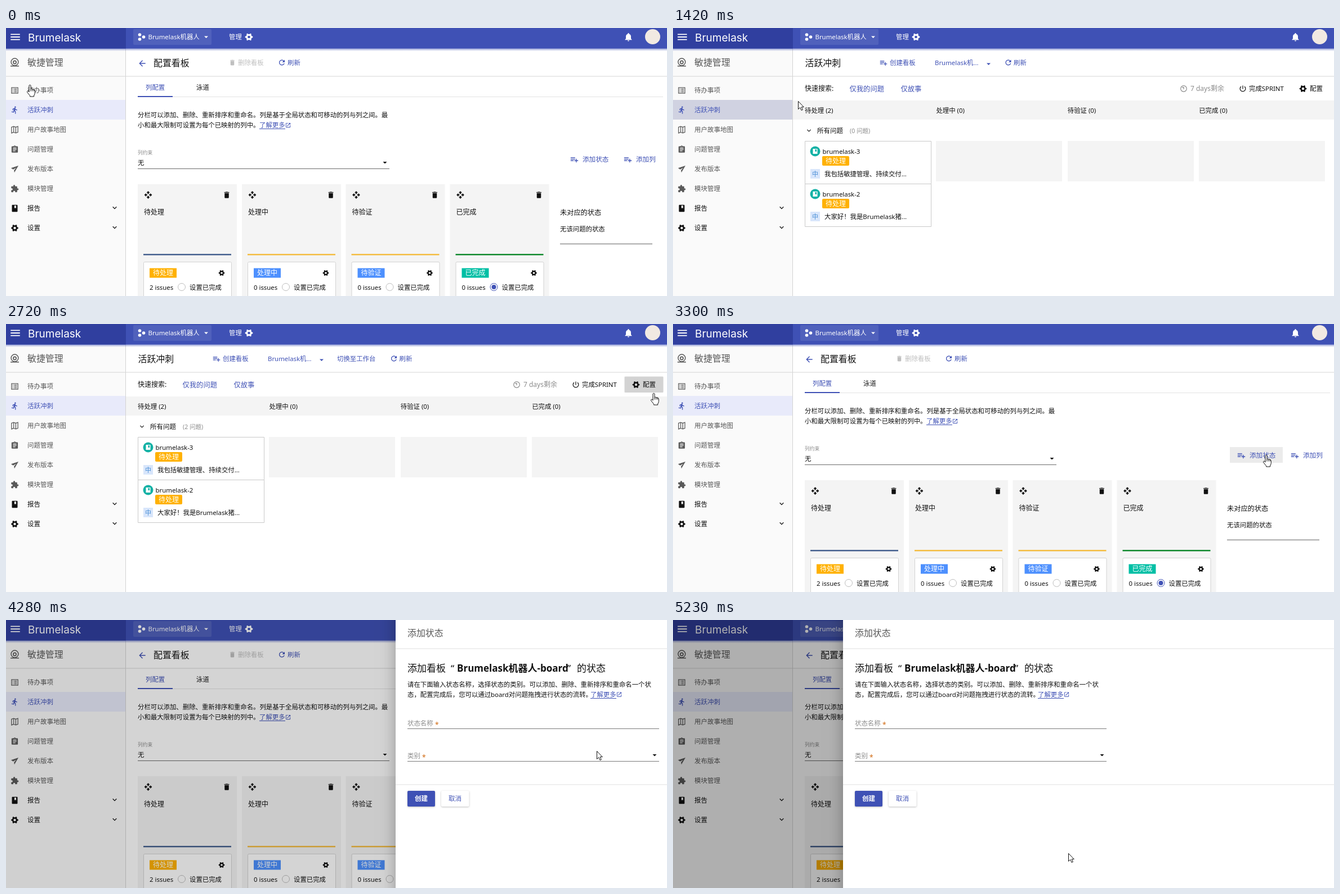
Recreate the animation shown at these times as an HTML page with a canvas. Size 1174x477 px, loop 5310 ms.

```html
<!DOCTYPE html>
<html lang="zh-CN">
<head>
<meta charset="utf-8">
<title>看板</title>
<style>
html, body { margin: 0; width: 100%; height: 100%; overflow: hidden; background: #fff; }
canvas { display: block; width: 1174px; height: 477px; }
</style>
</head>
<body>
<canvas id="stage"></canvas>
<script>
const W = 1174, H = 477, LOOP = 5310;
const BLUE = '#3f51b5', INK = '#111', GREY = '#8c8c8c', SOFT = '#595959', AMBER = '#ffb100';
const BRAND = 'Brumelask';
const FONT = '"Noto Sans", "Noto Sans CJK SC", "Noto Sans CJK JP", sans-serif';
const canvas = document.getElementById('stage');
const dpr = window.devicePixelRatio || 1;
canvas.width = W * dpr;
canvas.height = H * dpr;
const c = canvas.getContext('2d');

// Icons on a 24 unit grid
const ICON = {
  menu: 'M3 18h18v-2H3v2zm0-5h18v-2H3v2zm0-7v2h18V6H3z',
  trash: 'M6 19c0 1.1.9 2 2 2h8c1.1 0 2-.9 2-2V7H6v12zM19 4h-3.5l-1-1h-5l-1 1H5v2h14V4z',
  move: 'M10 9h4V6h3l-5-5-5 5h3v3zm-1 1H6V7l-5 5 5 5v-3h3v-4zm14 2l-5-5v3h-3v4h3v3l5-5zm-9 3h-4v3H7l5 5 5-5h-3v-3z',
  add: 'M14 10H2v2h12v-2zm0-4H2v2h12V6zm4 8v-4h-2v4h-4v2h4v4h2v-4h4v-2h-4zM2 16h8v-2H2v2z',
  refresh: 'M17.65 6.35C16.2 4.9 14.21 4 12 4c-4.42 0-7.99 3.58-7.99 8s3.57 8 7.99 8c3.73 0 6.84-2.55 7.73-6h-2.08c-.82 2.33-3.04 4-5.65 4-3.31 0-6-2.69-6-6s2.69-6 6-6c1.66 0 3.14.69 4.22 1.78L13 11h7V4l-2.35 2.35z',
  back: 'M20 11H7.83l5.59-5.59L12 4l-8 8 8 8 1.41-1.41L7.83 13H20v-2z',
  chevron: 'M16.59 8.59L12 13.17 7.41 8.59 6 10l6 6 6-6z',
  caret: 'M6 9.5l6 6 6-6z',
  bell: 'M12 22c1.1 0 2-.9 2-2h-4c0 1.1.89 2 2 2zm6-6v-5c0-3.07-1.64-5.64-4.5-6.32V4c0-.83-.67-1.5-1.5-1.5s-1.5.67-1.5 1.5v.68C7.63 5.36 6 7.92 6 11v5l-2 2v1h16v-1l-2-2z',
  run: 'M13.49 5.48c1.1 0 2-.9 2-2s-.9-2-2-2-2 .9-2 2 .9 2 2 2zm-3.6 13.9l1-4.4 2.1 2v6h2v-7.5l-2.1-2 .6-3c1.3 1.5 3.3 2.5 5.5 2.5v-2c-1.9 0-3.5-1-4.3-2.4l-1-1.6c-.4-.6-1-1-1.7-1-.3 0-.5.1-.8.1l-5.2 2.2v4.7h2v-3.4l1.8-.7-1.6 8.1-4.9-1-.4 2 7 1.4z',
  list: 'M2 3h20v18H2zM4 5v14h16V5zM6 7h2v2H6zM10 7h8v2h-8zM6 11h2v2H6zM10 11h8v2h-8zM6 15h2v2H6zM10 15h8v2h-8z',
  map: 'M2 4l7-2.5 6 2 7-2.5v19l-7 2.5-6-2-7 2.5zM4 5.5v14.5l4-1.5V4zM10 4v14.7l4 1.4V5.4zM16 5.4v14.6l4-1.5V4z',
  task: 'M19 3h-4.18C14.4 1.84 13.3 1 12 1c-1.3 0-2.4.84-2.82 2H5c-1.1 0-2 .9-2 2v14c0 1.1.9 2 2 2h14c1.1 0 2-.9 2-2V5c0-1.1-.9-2-2-2zm-7 0c.55 0 1 .45 1 1s-.45 1-1 1-1-.45-1-1 .45-1 1-1zm2 14H7v-2h7v2zm3-4H7v-2h10v2zm0-4H7V7h10v2z',
  send: 'M22.5 2.5L1.5 9l6 4L16 8.500l-6 7 1 6.500z',
  puzzle: 'M20.5 11H19V7c0-1.1-.9-2-2-2h-4V3.5C13 2.12 11.88 1 10.5 1S8 2.12 8 3.5V5H4c-1.1 0-1.99.9-1.99 2v3.8H3.5c1.49 0 2.7 1.21 2.7 2.7s-1.21 2.7-2.7 2.7H2V20c0 1.1.9 2 2 2h3.8v-1.5c0-1.49 1.21-2.7 2.7-2.7 1.49 0 2.7 1.21 2.7 2.7V22H17c1.1 0 2-.9 2-2v-4h1.5c1.38 0 2.5-1.12 2.5-2.5S21.88 11 20.5 11z',
  book: 'M18 2H6c-1.1 0-2 .9-2 2v16c0 1.1.9 2 2 2h12c1.1 0 2-.9 2-2V4c0-1.1-.9-2-2-2zM11 4h5v8l-2.5-1.5L11 12z',
  open: 'M19 19H5V5h7V3H5c-1.11 0-2 .9-2 2v14c0 1.1.89 2 2 2h14c1.1 0 2-.9 2-2v-7h-2v7zM14 3v2h3.59l-9.83 9.83 1.41 1.41L19 6.41V10h2V3h-7z',
  power: 'M13 3h-2v10h2V3zm4.83 2.17l-1.42 1.42C17.99 7.86 19 9.81 19 12c0 3.87-3.13 7-7 7s-7-3.13-7-7c0-2.19 1.01-4.14 2.58-5.42L6.17 5.17C4.23 6.82 3 9.26 3 12c0 4.97 4.03 9 9 9s9-4.03 9-9c0-2.74-1.23-5.18-3.17-6.83z'
};
for (const k in ICON) ICON[k] = new Path2D(ICON[k]);
ICON.gear = new Path2D();
for (let i = 0; i < 24; i++) {
  const a = (i - .5) * Math.PI / 12, r = i % 4 < 2 ? 10.3 : 7.6;
  ICON.gear.lineTo(12 + r * Math.cos(a), 12 + r * Math.sin(a));
}
ICON.gear.closePath();
ICON.gear.moveTo(15.5, 12);
ICON.gear.arc(12, 12, 3.5, 0, 7);

const HAND = new Path2D('M4 13V2.2Q5.5 .3 7 2.2V8.5Q8.5 7.4 9.8 9Q11.4 8.2 12.4 9.8Q14 9.4 14.3 11.5V15.5Q14.3 18 12.6 20V22H5.6V20.5L.8 14.5Q0 12.4 1.7 12Q3 12.3 4 14z');
const ARROW = new Path2D('M.5 .5V14.500L3.800 11.500 6 16.500 8.300 15.500 6.200 10.700H10.300z');

function box(x, y, w, h, fill) {
  c.fillStyle = fill;
  c.fillRect(x, y, w, h);
}
function round(x, y, w, h, r, fill, stroke) {
  c.beginPath();
  c.roundRect(x, y, w, h, r);
  if (fill) { c.fillStyle = fill; c.fill(); }
  if (stroke) { c.strokeStyle = stroke; c.lineWidth = 1; c.stroke(); }
}
function disc(x, y, r, fill) {
  c.beginPath();
  c.arc(x, y, r, 0, 7);
  c.fillStyle = fill;
  c.fill();
}
function ring(x, y, r, color, width = 1) {
  c.beginPath();
  c.arc(x, y, r, 0, 7);
  c.strokeStyle = color;
  c.lineWidth = width;
  c.stroke();
}
// Text by left edge and middle line
function text(s, x, y, color = INK, size = 11.4, weight = 400, font = FONT) {
  c.font = `${weight} ${size}px ${font}`;
  c.fillStyle = color;
  c.fillText(s, x, y + size * .37);
}
function icon(name, x, y, color, size = 15) {
  c.save();
  c.translate(x - size / 2, y - size / 2);
  c.scale(size / 24, size / 24);
  c.fillStyle = color;
  c.fill(ICON[name], 'evenodd');
  c.restore();
}
function shadow(alpha, blur, dy = 0) {
  c.shadowColor = `rgba(0,0,0,${alpha})`;
  c.shadowBlur = blur * dpr;
  c.shadowOffsetY = dy * dpr;
}
function link(x, y) {
  text('了解更多', x, y, BLUE);
  box(x, Math.round(y + 6), 46, 1, BLUE);
  icon('open', x + 51, y, BLUE, 11);
}
function tag(s, x, y, color, r = 0) {
  round(x, y, 48, 17, r, color);
  text(s, x + 6, y + 8.5, '#fff', 12);
}
function ripple(x, y, w, h, cx, cy, radius) {
  if (radius <= 0) return;
  c.save();
  c.beginPath();
  c.rect(x, y, w, h);
  c.clip();
  disc(cx, cy, radius, 'rgba(0,0,0,.1)');
  c.restore();
}

// Number of the n updates between a and b done by time t
function steps(t, a, b, n) {
  if (t < a) return 0;
  if (n < 2 || t >= b) return n;
  return Math.floor((t - a) / (b - a) * (n - 1) + 1e-6) + 1;
}
const part = (t, a, b, n) => steps(t, a, b, n) / n;
const within = (t, a, b) => t >= a && t < b;

function header() {
  const g = c.createLinearGradient(0, 36, 0, 41);
  g.addColorStop(0, 'rgba(63,81,181,.6)');
  g.addColorStop(1, 'rgba(63,81,181,0)');
  box(0, 36, W, 5, g);
  box(0, 0, W, 36.5, BLUE);
  box(0, 0, 213, 36.5, '#303f9f');
  icon('menu', 16.5, 16, '#fff', 22);
  text(BRAND, 39, 16.5, '#fff', 19, 400, 'Inter, sans-serif');
  round(226, 2, 139, 28, 2, '#5061bc');
  disc(237.5, 12, 2.8, '#fff');
  disc(244.5, 16, 2.8, '#fff');
  disc(237.5, 20, 2.8, '#fff');
  text(BRAND + '机器人', 252.5, 16, '#fff');
  icon('caret', 355.5, 16, '#fff', 14);
  text('管理', 396, 16, '#fff');
  icon('gear', 431.5, 16, '#fff', 16);
  icon('bell', 1105.5, 16, '#fff', 18);
  disc(1148.5, 15.5, 13.5, '#f1e9e2');
}

const MENU = [['list', '待办事项'], ['run', '活跃冲刺'], ['map', '用户故事地图'], ['task', '问题管理'],
  ['send', '发布版本'], ['puzzle', '模块管理'], ['book', '报告'], ['gear', '设置']];

function sidebar(t) {
  box(0, 37, 212, 440, '#fafafa');
  box(212, 37, 1, 440, '#d3d3d3');
  ring(15.5, 60.5, 6.4, SOFT, 1.5);
  ring(15.5, 61, 2.6, SOFT, 1.6);
  box(8, 67, 15, 1.5, SOFT);
  text('敏捷管理', 38, 61, SOFT, 15.9);
  box(0, 128, 212, 35, '#e8eafa');
  if (within(t, 930, 1550)) ripple(0, 128, 212, 35, 48, 146, 190 * part(t, 930, 1250, 5));
  MENU.forEach(([name, label], i) => {
    const y = 111 + 35 * i, color = i === 1 ? BLUE : i > 5 ? INK : SOFT;
    icon(name, 15.5, y, color, 15);
    text(label, 38, y, color, 11.5);
    if (i > 5) icon('chevron', 193, y - 1, INK, 15);
  });
}

const COLUMNS = [
  [234, '待处理', '#46618f', AMBER], [419, '处理中', '#f4bd43', '#4d90fe'],
  [603.5, '待验证', '#f4bd43', '#4d90fe'], [788.5, '已完成', '#128a2f', '#00bfa5']];

function column([x, name, line, color], i) {
  const last = i === 3;
  box(x, 278, 176, 199, '#f4f4f4');
  icon('move', x + 18.5, 297, INK, 15);
  icon('trash', x + 158, 297, INK, 15);
  text(name, x + 11, 328, INK, 12);
  box(x + 10, 402, 156, 2.5, line);
  round(x + 10.5, 416.5, 156, 80, 2, '#fff', '#d2d2d2');
  tag(name, x + 21, 427.5, color);
  icon('gear', x + 149, 436, INK, 12.5);
  text((i ? 0 : 2) + ' issues', x + 21, 462);
  ring(x + 78, 461, 6.5, last ? BLUE : '#bdbdbd');
  if (last) disc(x + 78, 461, 4, BLUE);
  text('设置已完成', x + 92, 462);
}

function configPage(t) {
  icon('back', 242, 63, BLUE, 17);
  text('配置看板', 262, 62, INK, 15.9);
  icon('trash', 402, 61.5, '#bfbfbf', 13);
  text('删除看板', 412, 61.5, '#bfbfbf');
  icon('refresh', 490, 61.5, BLUE);
  text('刷新', 500, 61.5, BLUE);
  text('列配置', 248, 106, BLUE);
  text('泳道', 338, 106);
  box(234, 122, 933, 1, '#e2e2e2');
  box(234, 121, 62, 2, BLUE);
  text('分栏可以添加、删除、重新排序和重命名。列是基于全局状态和可移动的列与列之间。最', 234, 155);
  text('小和最大限制可设置为每个已映射的列中。', 234, 173);
  link(450, 173);
  text('列约束', 234, 222, GREY, 8.7);
  text('无', 234, 240);
  box(234, 250, 447, 1, '#6b6b6b');
  icon('caret', 673, 239.5, INK, 14);
  if (t >= 2970) box(989, 219, 94, 28, 'rgba(0,0,0,.08)');
  if (t >= 4040) ripple(989, 219, 94, 28, 1049, 234, 17.5 * steps(t, 4040, 4360, 5));
  icon('add', 1009.5, 234, BLUE, 16);
  text('添加状态', 1024, 234, BLUE, 11.6);
  icon('add', 1104.5, 234, BLUE, 16);
  text('添加列', 1119, 234, BLUE, 11.6);
  COLUMNS.forEach(column);
  text('未对应的状态', 984, 328, INK, 12.2);
  text('无该问题的状态', 984, 358);
  box(984, 383, 164, 2.5, '#b8b8b8');
}

function issue(y, num, summary) {
  round(234.5, y + .5, 224, 76, 0, '#fff', '#c9c9c9');
  disc(252.5, y + 18.5, 9, '#12b1a5');
  box(248.5, y + 14, 8, 9, '#fff');
  box(252.5, y + 15, 2.5, 4, '#12b1a5');
  text(BRAND.toLowerCase() + '-' + num, 265.5, y + 18.5);
  tag('待处理', 265, y + 27, AMBER, 2);
  box(244, y + 50, 17, 17, '#d8e6fb');
  text('中', 247, y + 58.5, '#4a8fd6', 11);
  text(summary, 269, y + 58.5);
}

function sprintPage(t) {
  const loaded = t >= 1550, shift = loaded ? 93.5 : 0;
  text('活跃冲刺', 234.5, 62, INK, 15.9);
  icon('add', 374, 62, BLUE, 15);
  text('创建看板', 385, 61.5, BLUE);
  text(BRAND + '机...', 465, 62, BLUE, 11.4, 500);
  icon('caret', 560.5, 64, BLUE, 14);
  if (loaded) text('切换至工作台', 588, 61.5, BLUE);
  icon('refresh', 595.5 + shift, 61.5, BLUE);
  text('刷新', 605 + shift, 61.5, BLUE);
  text('快速搜索:', 234, 108, INK, 12);
  text('仅我的问题', 313.5, 108, BLUE, 12.3);
  text('仅故事', 404.5, 108, BLUE, 12.3);
  ring(907, 108, 5.3, GREY, 1.2);
  box(904, 105, 3.5, 1.2, GREY);
  box(906.4, 105, 1.2, 4, GREY);
  text('7 days剩余', 919, 108, GREY, 12);
  icon('power', 1012, 108, INK, 14.5);
  text('完成SPRINT', 1023, 108, INK, 11.4, 500);
  if (t >= 2000) round(1098.5, 93.5, 69, 28.5, 2, 'rgba(0,0,0,.08)');
  if (t >= 2560) ripple(1098.5, 93.5, 69, 28.5, 1148, 114, 60 * part(t, 2560, 2720, 3));
  icon('gear', 1119, 108, INK, 15);
  text('配置', 1131, 108, INK, 11.5, 500);
  box(213, 129, W - 213, 34, '#f4f4f4');
  ['待处理 (2)', '处理中 (0)', '待验证 (0)', '已完成 (0)'].forEach((s, i) => {
    const x = 234 + 233.4 * i;
    if (i) box(Math.round(x), 201, 224, 72, '#f4f4f4');
    text(s, x, 147);
  });
  icon('chevron', 241.5, 182.5, INK, 14);
  text('所有问题', 256, 183, INK, 11.5);
  text(`(${loaded ? 2 : 0} 问题)`, 314, 183, GREY, 10.5);
  issue(201, 3, '我包括敏捷管理、持续交付...');
  issue(277, 2, `大家好！我是${BRAND}猪...`);
}

function field(label, line, starX) {
  text(label, 323, line - 9.5, GREY);
  text('*', starX, line - 6, '#d0680f', 12);
  box(323, line, 447, 1, '#7a7a7a');
}

function drawer(offset) {
  c.save();
  c.translate(offset, 0);
  shadow(.3, 26, 6);
  box(302, -30, 880, H + 60, '#fff');
  shadow(0, 0);
  text('添加状态', 323, 23, SOFT, 15.9);
  box(302, 50.5, 872, 1, '#e0e0e0');
  text('添加看板', 323, 86, INK, 17);
  text('“', 400, 86, INK, 17);
  text(BRAND + '机器人-board', 411, 86, INK, 17, 600);
  text('”', 607, 86, INK, 17);
  text('的状态', 624, 86, INK, 17);
  text('请在下面输入状态名称，选择状态的类别。可以添加、删除、重新排序和重命名一个状', 323, 115);
  text('态，配置完成后，您可以通过board对问题拖拽进行状态的流转。', 323, 132.5);
  link(648, 132.5);
  field('状态名称', 193, 372);
  field('类别', 251, 349);
  icon('caret', 762, 240.5, INK, 14);
  box(302, 292.5, 872, 1, '#e0e0e0');
  shadow(.25, 3, 1);
  round(323, 304, 49, 28, 2, BLUE);
  round(383, 304, 49.5, 28, 2, '#fff');
  shadow(0, 0);
  text('创建', 336, 318, '#fff', 11.5, 700);
  text('取消', 396, 318, BLUE, 11.5);
  c.restore();
}

// Pointer moves: start, end, updates, x, y
const MOVES = [
  [80, 410, 5, 45, 138], [1010, 1420, 6, 222, 130], [1470, 1700, 4, 820, 98],
  [1850, 2340, 7, 1158, 99], [2440, 2720, 5, 1145, 122], [2800, 2970, 3, 1076, 238],
  [3060, 3300, 4, 1048, 232], [4040, 4040, 1, 1049, 233], [4530, 4980, 7, 737, 376],
  [5080, 5230, 3, 702, 415]];

function pointer(t) {
  let x = 37, y = 100;
  for (const [a, b, n, nx, ny] of MOVES) {
    const p = (1 - Math.cos(Math.PI * part(t, a, b, n))) / 2;
    x += (nx - x) * p;
    y += (ny - y) * p;
  }
  const arrow = within(t, 1420, 2000) || within(t, 2800, 2970) || t >= 4040;
  const shape = arrow ? ARROW : HAND;
  c.save();
  c.translate(x, y);
  c.fillStyle = '#fff';
  c.strokeStyle = '#111';
  c.lineWidth = 1;
  c.lineJoin = 'round';
  c.fill(shape);
  c.stroke(shape);
  if (!arrow) {
    c.beginPath();
    for (const px of [7, 9.8, 12.4]) {
      c.moveTo(px, 8.5);
      c.lineTo(px, 12.5);
    }
    c.stroke();
  }
  c.restore();
}

function draw(t) {
  c.setTransform(dpr, 0, 0, dpr, 0, 0);
  box(0, 0, W, H, '#fff');
  sidebar(t);
  box(0, 85.5, W, 1, '#d6d6d6');
  if (within(t, 1090, 2800)) sprintPage(t);
  else configPage(t);
  header();
  const k = steps(t, 4200, 4440, 4);
  if (k) box(0, 0, W, H, `rgba(0,0,0,${[0, .05, .17, .29, .3][k]})`);
  if (k > 1) drawer(k === 2 ? 390 : 0);
  pointer(t);
}

const start = performance.now();
function tick() {
  draw((performance.now() - start) % LOOP);
  requestAnimationFrame(tick);
}
tick();
</script>
</body>
</html>
```
